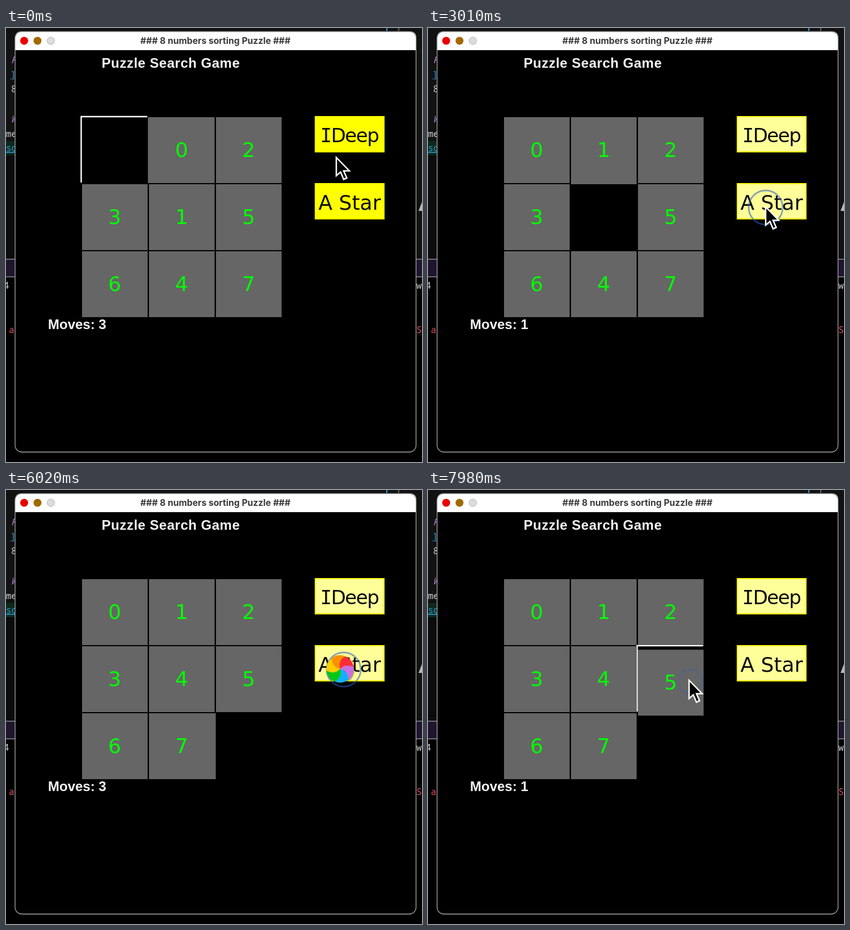
Recreate the animation shown at these times as an HTML page. Size 733x764 px, loop 8 s.

```html
<!DOCTYPE html>
<html lang="en">
<head>
<meta charset="utf-8">
<title>8 numbers sorting Puzzle</title>
<style>
html, body { margin: 0; width: 100%; height: 100%; overflow: hidden; background: #000; }
svg { display: block; width: 733px; height: 764px; }
.code { font: 16px "Noto Sans Mono", monospace; }
.bold { font: bold 24px "Liberation Sans", Arial, sans-serif; fill: #f4f4f4; }
.bar { font: bold 15.7px Inter, sans-serif; fill: #3a3a3a; text-anchor: middle; }
.digit { font: 36px "DejaVu Sans", sans-serif; fill: #0f0; text-anchor: middle; }
.label { font: 36px "DejaVu Sans", sans-serif; fill: #0a0a0a; text-anchor: middle; }
.wide { font-size: 34px; letter-spacing: -1.5px; }
.wide tspan { font-family: "DejaVu Sans Mono", monospace; }
</style>
</head>
<body>
<svg viewBox="0 0 733 764">
  <!-- editor behind the window -->
  <path fill="#121213" d="M0 0H733V407H0z"/>
  <path fill="#0c0c0d" d="M0 224H16V407H0z"/>
  <path fill="#0c2a1d" d="M0 199H16V224H0z"/>
  <path fill="#1f152e" d="M0 407H733V438H0z"/>
  <path stroke="#8d8a94" stroke-width="1.3" d="M0 407H733M0 438H733"/>
  <path stroke="#2b9fd8" stroke-width="2" d="M671 0V5"/>
  <path stroke="#666" stroke-width="2" d="M692 0V5"/>
  <g class="code" fill="#ccc">
    <text x="-6" y="62" fill="#d08a4a">'</text>
    <text x="9" y="62" fill="#b884d8" font-style="italic">F</text>
    <text x="8" y="88" fill="#2b9fd8" text-decoration="underline">]</text>
    <text x="9" y="113">8</text>
    <text x="-6" y="166" fill="#d08a4a">'</text>
    <text x="9" y="166" fill="#b884d8" font-style="italic">W</text>
    <text x="0" y="192">me</text>
    <text x="0" y="217" fill="#2b9fd8" text-decoration="underline">so</text>
    <text x="-4" y="459">4</text>
    <text x="5" y="537" fill="#e0505e">a</text>
    <text x="723" y="459">w</text>
    <text x="723" y="537" fill="#e0505e">S</text>
  </g>
  <path fill="#bbb" d="M727 322L733 306V322z"/>

  <!-- window -->
  <rect x="16" y="6.5" width="706.5" height="740" rx="12"/>
  <path fill="#fff" d="M16 39V18Q16 6 28 6H711Q723 6 723 18V39z"/>
  <rect x="16" y="6.5" width="706.5" height="740" rx="12" fill="none" stroke="#a8a8a8" stroke-width="1.3"/>
  <circle cx="32" cy="22.5" r="7" fill="#e80000"/>
  <circle cx="55.5" cy="22.5" r="7" fill="#a06a00"/>
  <circle cx="79" cy="22.5" r="6.6" fill="#dcdcdc" stroke="#b4b4b4"/>
  <text class="bar" x="369" y="28">### 8 numbers sorting Puzzle ###</text>
  <text class="bold" x="168.5" y="70" letter-spacing=".5">Puzzle Search Game</text>
  <g id="game"></g>
</svg>
<script>
const LOOP = 8000, STEP = 70, CELL = 118;
const game = document.getElementById('game');

// column and row of each digit before the first move
const start = [[0, 0], [1, 1], [2, 0], [0, 1], [1, 2], [2, 1], [0, 2], [2, 2]];
const moves = [
  { at: -999, dur: 210, digit: 0, dx: 1, dy: 0, count: 3, outline: true },
  { at: 840, dur: 210, digit: 0, dx: -1, dy: 0, count: 0 },
  { at: 1890, dur: 210, digit: 1, dx: 0, dy: -1, count: 1 },
  { at: 3010, dur: 210, digit: 4, dx: 0, dy: -1, count: 2 },
  { at: 3990, dur: 140, digit: 7, dx: -1, dy: 0, count: 3 },
  { at: 7969, dur: 210, digit: 5, dx: 0, dy: 1, count: 1, outline: true }
];
const presses = [
  { from: 700, to: 7000, x: 595, y: 316 },
  { from: 7840, to: LOOP, x: 462, y: 337 }
];
// time, x, y of the pointer tip
const pointer = [
  [0, 581, 226], [70, 581, 226], [700, 594, 313], [5950, 594, 313],
  [6510, 446, 313], [7000, 446, 313], [7560, 459, 333], [LOOP, 459, 333]
];
const hang = [4340, 6930], win = [6510, 7490];
const petals = ['#cb70e0', '#12b0ff', '#00c814', '#ffcd00', '#ff9000', '#ff2d36'];

const clamp = v => Math.max(0, Math.min(1, v));
const ease = v => v * v * (3 - 2 * v);
const within = (t, [a, b]) => t >= a && t < b;
const left = c => 134 + CELL * c, top_ = r => 157 + CELL * r;

function tip(t) {
  const i = pointer.findIndex(p => p[0] > t);
  const [t0, x0, y0] = pointer[i - 1], [t1, x1, y1] = pointer[i];
  const k = ease((t - t0) / (t1 - t0));
  return [x0 + (x1 - x0) * k, y0 + (y1 - y0) * k];
}

function board(t) {
  const cells = start.map(c => [...c]);
  const done = moves.filter(m => t > m.at), last = done[done.length - 1];
  let corner = '';
  for (const m of done) {
    const cell = cells[m.digit], k = clamp((t - m.at) / m.dur);
    if (m === last && m.outline)
      corner = `<path d="M${left(cell[0]) - 1.5} ${top_(cell[1]) + 115}v-116h116.5" fill="none" stroke="#fff" stroke-width="2.4"/>`;
    cell[0] += m.dx * k;
    cell[1] += m.dy * k;
  }
  // a settled tile keeps a 2px trail on the side it came from
  const settled = t >= last.at + last.dur;
  const tiles = cells.map(([c, r], n) => {
    const trail = settled && n === last.digit ? 2 : 0;
    const x = left(c), y = top_(r), tx = trail * last.dx, ty = trail * last.dy;
    return `<rect x="${x - Math.max(0, tx)}" y="${y - Math.max(0, ty)}" width="${115.6 + Math.abs(tx)}" height="${116 + Math.abs(ty)}" fill="#666"/>
      <text class="digit" x="${x + 57.5}" y="${y + 70}">${n}</text>`;
  }).join('');
  return corner + tiles + `<text class="bold" x="74" y="530">Moves: ${last.count}</text>`;
}

function buttons(t) {
  const box = y => t > 840
    ? `<rect x="545" y="${y + 1}" width="121" height="62" fill="#ff9" stroke="#ff0" stroke-width="2"/>`
    : `<rect x="544" y="${y}" width="123" height="64" fill="#ff0"/>`;
  return box(155) + box(273) +
    '<text class="label wide" x="605" y="201"><tspan>I</tspan>Deep</text>' +
    '<text class="label" x="605.5" y="320">A Star</text>';
}

function rings(t) {
  return presses.filter(p => t >= p.from && t < p.to).map(p => {
    const k = clamp((t - p.from) / 280);
    return `<circle cx="${p.x}" cy="${p.y}" r="${12 + 18 * k}" fill="none" stroke="#2c5cc0" stroke-opacity="${0.55 * k}" stroke-width="3"/>`;
  }).join('');
}

function wheel(t) {
  const at = (deg, r) => {
    const a = deg * Math.PI / 180;
    return `${(r * Math.sin(a)).toFixed(2)} ${(-r * Math.cos(a)).toFixed(2)}`;
  };
  const turn = 206 + 0.381 * (t - 5320);
  return '<circle cx="1" cy="2" r="24.5" opacity=".3"/>' + petals.map((fill, i) => {
    const a = turn + i * 60 - 30, b = a + 60;
    return `<path fill="${fill}" d="M0 0Q${at(a - 38, 15)} ${at(a, 24)}A24 24 0 0 1 ${at(b, 24)}Q${at(b - 38, 15)} 0 0z"/>`;
  }).join('');
}

function cursor(t) {
  const [x, y] = tip(t);
  return within(t, hang)
    ? `<g transform="translate(${x + 1} ${y + 2})">${wheel(t)}</g>`
    : `<path transform="translate(${x} ${y})" d="M1 2V34L8.5 27.5 14 40.5 19.5 38 14 25.5H24z" stroke="#fff" stroke-width="2.5"/>`;
}

function draw(t) {
  game.innerHTML = board(t) + buttons(t) +
    (within(t, win) ? '<text class="bold" x="169" y="589">You Win !!!</text>' : '') +
    rings(t) + cursor(t);
}

const begin = performance.now();
let shown = -1;
function tick() {
  const t = Math.floor((performance.now() - begin) % LOOP / STEP) * STEP;
  if (t !== shown) draw(shown = t);
  requestAnimationFrame(tick);
}
tick();
</script>
</body>
</html>
```
